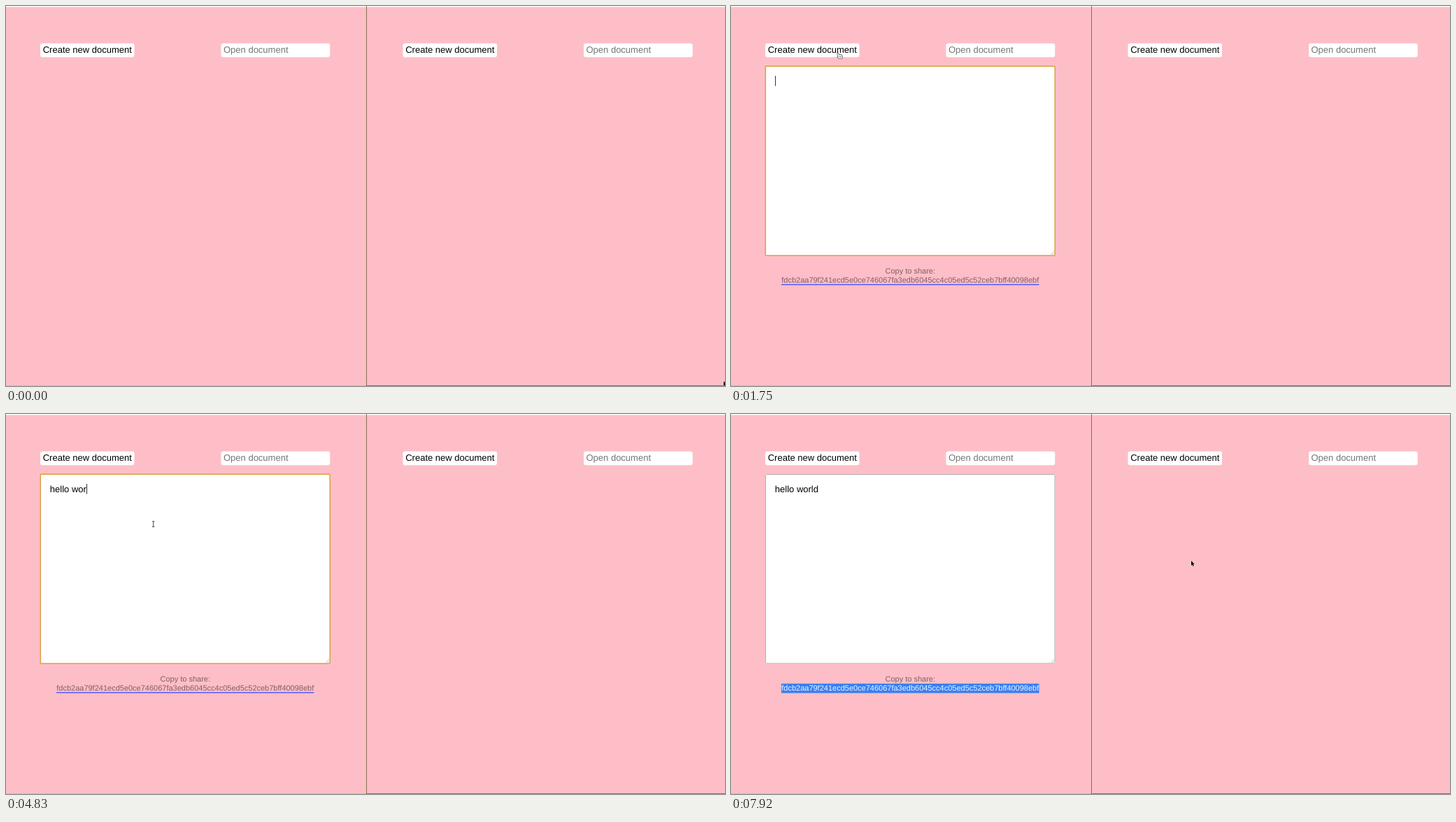
Animation of 1028x544 px, one loop 8000 ms. Source, as an HTML page with a canvas:

```html
<!DOCTYPE html>
<html lang="en">
<head>
<meta charset="utf-8">
<title>Shared document</title>
<style>
html, body { margin: 0; width: 100%; height: 100%; overflow: hidden; background: #febec7; }
canvas { display: block; width: 1028px; height: 544px; }
</style>
</head>
<body>
<canvas id="stage" width="1028" height="544"></canvas>
<script>
const ctx = document.getElementById("stage").getContext("2d");
const LOOP = 8000, FPS = 12;
const FONT = '"Liberation Sans", Arial, sans-serif';
const PINK = "#febec7", ORANGE = "#d9a03c", LINE = "#88714f", NOTE = "#7f5f64";
const HASH = "fdcb2aa79f241ecd5e0ce746067fa3edb6045cc4c05ed5c52ceb7bff40098ebf";
const PANE_SHIFT = 518.5;
const BUTTON = { x: 49, y: 53.5, w: 134.5, h: 19.7 };
const INPUT = { ...BUTTON, x: 307.5, w: 155.7 };
const PAGE = { x: 49, y: 86, w: 414.5, h: 271.5 };
const LINK = { x: 72, y: 374, w: 368.5, h: 25.5 };
const CENTER = LINK.x + LINK.w / 2;

// Times below are ticks of the 12 per second clock
const PRESS = 20, CREATE = 21, BLUR = 84, SELECT = 90, BLINK = 6;

// Keystrokes of a burst are split by "|" and come at an even gap
const BURSTS = [
  { at: 22, gap: 1, keys: "" },
  { at: 40, gap: 2, keys: "he|l|l" },
  { at: 49, gap: 2, keys: "o| " },
  { at: 56, gap: 1, keys: "w|o|r||ld" }
];

// The pointer rests between these moves
const START = { x: 1026, y: 537 };
const MOVES = [
  { at: 3, x: 626, y: 254 },
  { at: 8, x: 182, y: 130 },
  { at: 13, x: 46, y: 110 },
  { at: 16, x: 153.5, y: 68 },
  { at: 23, x: 210.7, y: 157.6, span: 6 },
  { at: 69, x: 613, y: 62, span: 4 },
  { at: 74, x: 622, y: 69, span: 2 },
  { at: 77, x: 340, y: 366 },
  { at: 81, x: 303.5, y: 388, span: 4 },
  { at: 87, x: 149, y: 388 },
  { at: 92, x: 658, y: 210 }
];

const ease = k => k * k * (3 - 2 * k);
const clamp = k => Math.min(1, Math.max(0, k));

function fill(color, x, y, w, h) {
  ctx.fillStyle = color;
  ctx.fillRect(x, y, w, h);
}

function text(str, x, y, size, color, align = "left") {
  ctx.font = `${size}px ${FONT}`;
  ctx.textAlign = align;
  ctx.fillStyle = color;
  ctx.fillText(str, x, y);
}

function box({ x, y, w, h }, radius) {
  ctx.beginPath();
  ctx.roundRect(x, y, w, h, radius);
  ctx.fillStyle = "#fff";
  ctx.fill();
}

function ring({ x, y, w, h }, color, width, inset) {
  ctx.beginPath();
  ctx.roundRect(x + inset, y + inset, w - 2 * inset, h - 2 * inset, 1);
  ctx.strokeStyle = color;
  ctx.lineWidth = width;
  ctx.stroke();
}

function lines(color, width, ...segments) {
  ctx.strokeStyle = color;
  ctx.lineWidth = width;
  ctx.beginPath();
  for (const [x0, y0, x1, y1] of segments) {
    ctx.moveTo(x0, y0);
    ctx.lineTo(x1, y1);
  }
  ctx.stroke();
}

function shape(path, x, y, inside, outline, width) {
  ctx.save();
  ctx.translate(x, y);
  ctx.lineJoin = "round";
  ctx.lineWidth = width;
  ctx.strokeStyle = outline;
  ctx.stroke(path);
  ctx.fillStyle = inside;
  ctx.fill(path);
  ctx.restore();
}

function drawToolbar(shift, pressed) {
  ctx.save();
  ctx.translate(shift, 0);
  box(BUTTON, 3);
  if (pressed) ring(BUTTON, ORANGE, 1.2, 0);
  text("Create new document", BUTTON.x + 3.7, 67.4, 13, "#000");
  box(INPUT, 3);
  text("Open document", INPUT.x + 3.5, 67.4, 13, "#757575");
  ctx.restore();
}

function typedAt(tick) {
  let typed = "", since = BURSTS[0].at;
  for (const { at, gap, keys } of BURSTS) {
    keys.split("|").forEach((key, i) => {
      if (at + i * gap > tick) return;
      typed += key;
      since = at + i * gap;
    });
  }
  return { typed, since };
}

function drawDocument(tick) {
  const focused = tick < BLUR, selected = tick >= SELECT;
  box(PAGE, 0);
  if (focused) ring(PAGE, ORANGE, 1.5, 0.3);
  else ring(PAGE, "#b3aaab", 1, 0.5);
  const right = PAGE.x + PAGE.w - 1.7, bottom = PAGE.y + PAGE.h - 1.7;
  lines("#999", 0.6, ...[2, 4.5].map(d => [right - d, bottom, right, bottom - d]));

  const { typed, since } = typedAt(tick);
  text(typed, 62.8, 111.5, 13, "#000");
  const blink = Math.floor(Math.max(0, tick - since) / BLINK) % 2;
  if (focused && !blink) {
    fill("#333", 63 + ctx.measureText(typed).width, 100, 1, 14.5);
  }

  text("Copy to share:", CENTER, 383.4, 11, NOTE, "center");
  if (selected) fill("#3a80f2", LINK.x, 386, LINK.w, 13.5);
  else fill("#6260fb", LINK.x, 398, LINK.w, 1.6);
  text(HASH, CENTER, 395.7, 11, selected ? "#f0f4ff" : NOTE, "center");
}

function pointerAt(tick) {
  let { x, y } = START;
  for (const move of MOVES) {
    const k = ease(clamp((tick - move.at) / (move.span || 3)));
    x += (move.x - x) * k;
    y += (move.y - y) * k;
  }
  return { x, y };
}

const within = (p, { x, y, w, h }) => p.x >= x && p.x <= x + w && p.y >= y && p.y <= y + h;

const ARROW = new Path2D("M0 0V7.2L1.6 5.8L2.7 8.2L3.8 7.7L2.8 5.3L5 5.2Z");
const HAND = new Path2D("M-1.5 0L-.3 -.4L1.2 2.2L3.4 1.6L5 2.8L5.6 5L4.7 7.4H1.7L-1.5 4.7L-.2 4Z");

const drawArrow = (x, y) => shape(ARROW, x, y, "#000", "#fff", 1);

function drawBeam(x, y) {
  const caps = [-3.8, 3.8].map(d => [x - 1.8, y + d, x + 1.8, y + d]);
  lines("#333", 0.9, [x, y - 3.5, x, y + 3.5], ...caps);
}

function drawHand(x, y) {
  shape(HAND, x, y, "#fff", "#222", 1.2);
  const fingers = [1.2, 2.5, 3.8].map(d => [x + d, y + 3.4, x + d + 0.4, y + 5.8]);
  lines("#333", 0.5, ...fingers);
}

function drawPointer(tick) {
  const p = pointerAt(tick);
  const overText = tick >= CREATE && (within(p, PAGE) || within(p, LINK));
  const overButton = [0, PANE_SHIFT].some(d => within({ x: p.x - d, y: p.y }, BUTTON));
  const draw = overText ? drawBeam : overButton ? drawHand : drawArrow;
  draw(p.x, p.y);
}

function render(now) {
  // A few ms of lead keep rounded times on their own tick
  const tick = Math.floor(((now + 5) % LOOP) * FPS / 1000);
  ctx.textRendering = "geometricPrecision";
  fill(PINK, 0, 0, 1028, 544);
  fill("#fff", 0, 0, 1028, 1.4);
  fill("#d3aaaf", 0, 543.3, 515, 0.7);
  fill(LINE, 515, 0, 1, 544);
  fill(LINE, 516, 543, 512, 1);
  drawToolbar(0, tick === PRESS);
  drawToolbar(PANE_SHIFT, false);
  if (tick >= CREATE) drawDocument(tick);
  drawPointer(tick);
}

const start = performance.now();
function loop() {
  render(performance.now() - start);
  requestAnimationFrame(loop);
}
loop();
</script>
</body>
</html>
```
